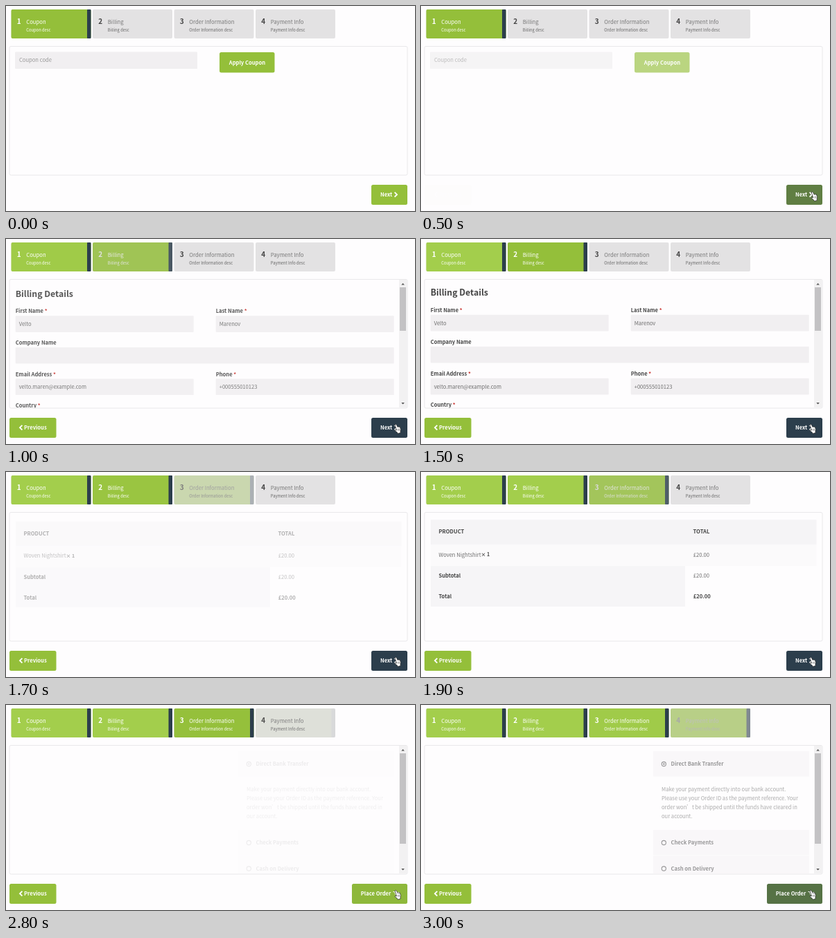
An HTML page for the animation above (3100 ms loop, 590 by 297 pixels).

```html
<!DOCTYPE html>
<html lang="en">
<head>
<meta charset="utf-8">
<title>Checkout steps</title>
<style>
  html, body { margin: 0; width: 100%; height: 100%; overflow: hidden; background: #fefdfe; }
  svg { display: block; width: 590px; height: 297px; font: 7.6px "Noto Sans CJK SC", "Noto Sans CJK JP", "Noto Sans", sans-serif; }
  text { white-space: pre; }
</style>
</head>
<body>
<svg id="stage" viewBox="0 0 590 297"></svg>
<script>
const LOOP = 3100;
const GREEN = [148, 191, 58], DONE = [163, 206, 76], DARK = [44, 62, 76];
const INK = '#444', SOFT = '#6e6e6e', FIELD = '#f1eff1';

const rgb = c => `rgb(${c.map(Math.round)})`;
const mix = (a, b, k) => rgb(a.map((v, i) => v + (b[i] - v) * k));
const ramp = (t, from, to) => Math.min(1, Math.max(0, (t - from) / (to - from)));

// Markup helpers; text is placed by the vertical middle of its capitals.
const box = (x, y, w, h, fill, extra = '') =>
  `<rect x="${x}" y="${y}" width="${w}" height="${h}" fill="${fill}" ${extra}/>`;
const text = (x, y, s, fill = SOFT, weight = 400, size = 7.6) =>
  `<text x="${x}" y="${y + size * 0.365}" fill="${fill}" font-weight="${weight}" font-size="${size}">${s}</text>`;
const bold = (x, y, s, fill = INK, size) => text(x, y, s, fill, 700, size);
const group = (id, body, extra = '') => `<g id="${id}" ${extra}>${body}</g>`;
const chevron = (x, y, dir) =>
  `<path d="M${x} ${y - 3.4}l${3.4 * dir} 3.4l${-3.4 * dir} 3.4" fill="none" stroke="#fff" stroke-width="1.9"/>`;
const button = (id, x, y, w, h, body) =>
  group(id, box(x, y, w, h, rgb(GREEN), 'rx="2.5"') + body);

function tab(title, i) {
  const x = 7.5 + i * 117.5;
  const labels = (number, name, desc) =>
    bold(x + 8.2, 22.7, i + 1, number, 10) +
    text(x + 21.8, 23.3, title, name, 400, 7.7) +
    text(x + 21.8, 35.2, title + ' desc', desc, 400, 5.8);
  return box(x, 5, 115, 42, '#e3e2e3', 'rx="2"') + labels(INK, '#777', '#666') +
    group('tab' + i, box(x, 5, 115, 42, rgb(GREEN), 'rx="2"') +
      box(x + 109.5, 5, 5.5, 42, rgb(DARK), 'rx="1"') + labels('#fff', '#fff', '#fff'));
}

function field(x, y, w, label, value, required) {
  const star = required ? ' <tspan fill="#c8302c">*</tspan>' : '';
  return bold(x, y, label + star) + box(x, y + 6.7, w, 23.8, FIELD, 'rx="1"') +
    text(x + 5, y + 18.8, value);
}

const scrollbar = (id, thumb) => group(id,
  box(567, 59, 11.5, 185.5, '#f2f1f2') + box(568, 70, 9, thumb, '#c3c2c4') +
  '<path d="M570.3 66.5h4.6l-2.3-2.6zM570.3 237h4.6l-2.3 2.6z" fill="#555"/>');

const coupon = box(13, 66.5, 263, 24.5, FIELD, 'rx="1"') + text(19, 78.7, 'Coupon code', '#999') +
  button('apply', 308, 67, 79.5, 29.5, bold(321.8, 82, 'Apply Coupon', '#fff'));

const billing = bold(13.7, 77.7, 'Billing Details', INK, 12.3) +
  field(13.7, 103, 257, 'First Name', 'Velto', true) +
  field(302.7, 103, 257, 'Last Name', 'Marenov', true) +
  field(13.7, 149, 546, 'Company Name', '') +
  field(13.7, 195, 257, 'Email Address', 'velto.maren@example.com', true) +
  field(302.7, 195, 257, 'Phone', '+000555010123', true) +
  field(13.7, 240.7, 546, 'Country', '', true);

const order = box(14, 68, 556.5, 36.5, '#f5f4f6') + box(14, 104.5, 556.5, 31, '#fbfafb') +
  box(14, 135.5, 367, 59, '#f6f5f7') +
  bold(25.5, 85.5, 'PRODUCT') + bold(392.5, 85.5, 'TOTAL') +
  text(25.5, 119, 'Woven Nightshirt') + bold(86.5, 119, '× 1', INK, 7) + text(392.8, 119, '£20.00') +
  bold(25.5, 149.5, 'Subtotal') + text(392.8, 149.5, '£20.00') +
  bold(25.5, 180, 'Total') + bold(392.8, 180, '£20.00');

const method = (y, name, chosen) => box(335, y - 18.5, 225, 36.5, '#f4f3f5') +
  `<circle cx="350.3" cy="${y}" r="3.1" fill="none" stroke="${INK}" stroke-width="1.1"/>` +
  (chosen ? `<circle cx="350.3" cy="${y}" r="1.2" fill="${INK}"/>` : '') + bold(360.5, y, name);

const payment = method(85.5, 'Direct Bank Transfer', true) +
  ['Make your payment directly into our bank account.',
   'Please use your Order ID as the payment reference. Your',
   'order won’t be shipped until the funds have cleared in',
   'our account.'].map((s, i) => text(347, 122.3 + i * 13.1, s, '#666')).join('') +
  method(199.5, 'Check Payments') + method(237, 'Cash on Delivery');

const hand = '<path d="M561 269.2q1.3-1.5 2.5.2l1.5 3.2 1-.8 1.2.6 1-.3 1.1 3.4-.4 3.4.4 1.7-4 1.4-1-1.8-3.1-2.4q-.5-1.6 1.2-1.2l1.1.5z" fill="#fff" stroke="#222" stroke-width=".7"/>' +
  '<path d="M565.3 275l.8 3M567 274.6l.7 2.8" stroke="#222" stroke-width=".5"/>';

const stage = document.getElementById('stage');
stage.innerHTML =
  '<clipPath id="inside"><rect x="5" y="59" width="574" height="185.5"/></clipPath>' +
  ['Coupon', 'Billing', 'Order Information', 'Payment Info'].map(tab).join('') +
  box(5, 58.5, 574, 186.5, '#fefdfe', 'rx="2" stroke="#e9e8ea"') +
  '<g clip-path="url(#inside)">' +
  [coupon, billing, order, payment].map((body, i) => group('page' + i, body)).join('') +
  scrollbar('bar1', 63) + scrollbar('bar3', 131) + '</g>' +
  button('previous', 5, 259, 67.5, 29, chevron(23.4, 273.2, -1) + bold(26, 273.2, 'Previous', '#fff')) +
  button('next', 527, 259, 52, 29, bold(540, 273.2, 'Next', '#fff') + chevron(560.6, 273.2, 1)) +
  button('place', 499, 259, 80, 29, bold(511.8, 273.2, 'Place Order', '#fff') +
    '<path d="M558.5 270.5h2l1.3 4h4.2l1-3h-5.5" fill="none" stroke="#fff"/>') +
  group('hand', hand);

const $ = id => document.getElementById(id);
const fade = (id, k) => {
  $(id).style.opacity = k;
  $(id).style.display = k > 0 ? '' : 'none';
};
const paint = (id, color) => $(id).firstChild.setAttribute('fill', color);
const squash = (id, since) => {
  const k = 1 - 0.028 * Math.exp(-since / 175);
  $(id).setAttribute('transform', `translate(0 ${295 * (1 - k)}) scale(1 ${k})`);
};

function draw(t) {
  const onBilling = t >= 700 && t < 1600, onOrder = t >= 1600 && t < 2800, onPayment = t >= 2800;

  fade('tab1', ramp(t, 600, 1080));
  fade('tab2', ramp(t, 1580, 1980));
  fade('tab3', ramp(t, 2780, 3190));
  paint('tab0', mix(GREEN, DONE, ramp(t, 600, 1100)));
  paint('tab1', mix(GREEN, DONE, ramp(t, 1580, 1900)));
  paint('tab2', mix(GREEN, DONE, ramp(t, 2780, 3050)));

  fade('page0', 1 - ramp(t, 400, 680));
  fade('page1', onBilling ? ramp(t, 730, 1030) : 0);
  fade('page2', onOrder ? ramp(t, 1560, 1900) : 0);
  fade('page3', onPayment ? ramp(t, 2760, 3200) : 0);
  squash('page1', t - 800);
  squash('page2', t - 1600);
  fade('bar1', +onBilling);
  fade('bar3', +onPayment);

  fade('previous', ramp(t, 500, 750));
  fade('next', +!onPayment);
  fade('place', +onPayment);
  paint('next', mix(GREEN, DARK, ramp(t, 380, 620)));
  paint('place', mix(GREEN, DARK, ramp(t, 2780, 3150)));

  const away = 1 - ramp(t, 400, 520);
  fade('hand', +(t >= 400));
  $('hand').setAttribute('transform', `translate(${14 * away} ${5 * away})`);
}

(function tick() {
  draw(performance.now() % LOOP);
  requestAnimationFrame(tick);
})();
</script>
</body>
</html>
```
